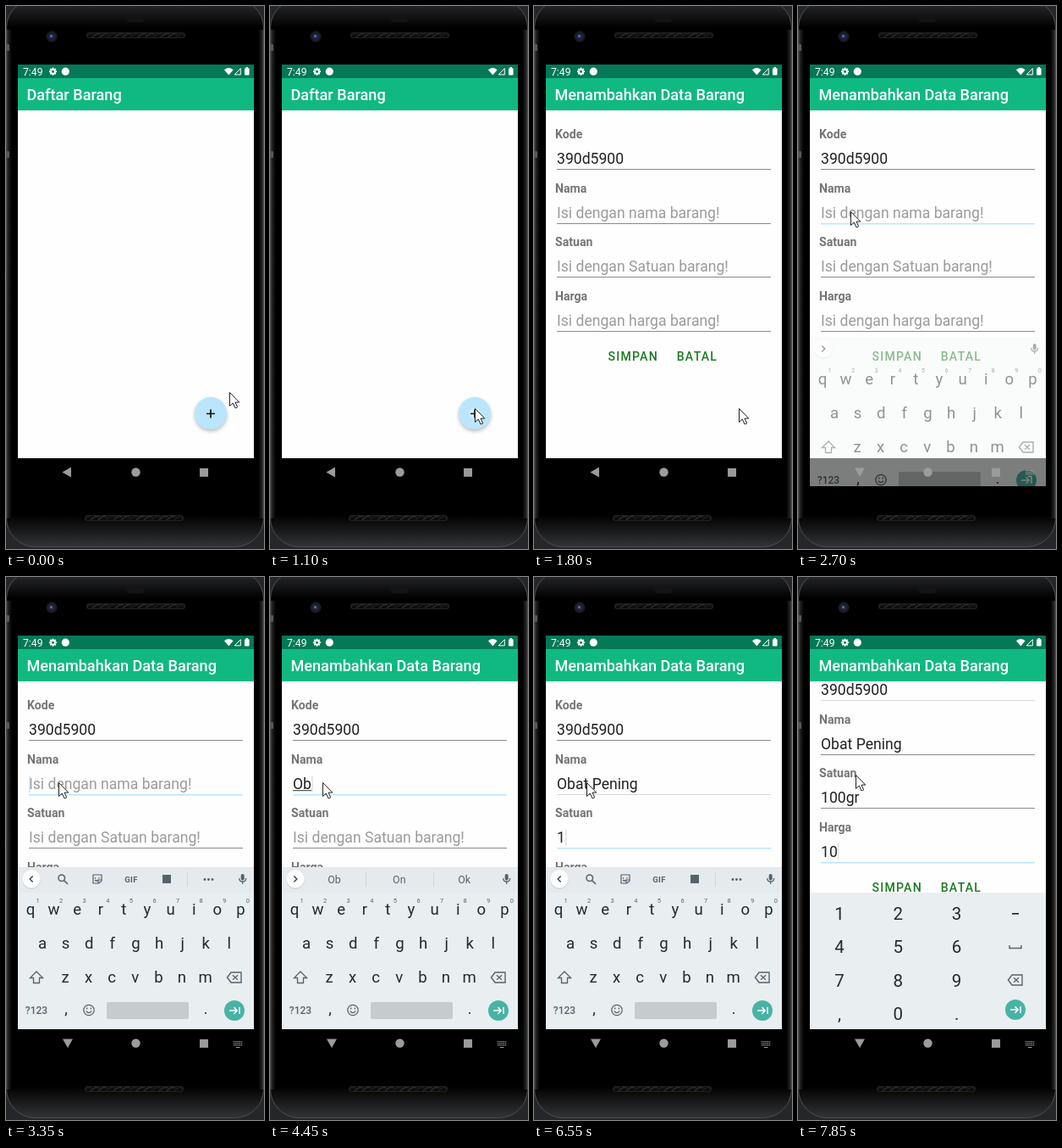
Animation of 305 by 640 pixels, one loop 8 s. Source, as an HTML page with a canvas:

```html
<!DOCTYPE html>
<html lang="id">
<head>
<meta charset="utf-8">
<title>Daftar Barang</title>
<style>
  html, body { margin: 0; width: 100%; height: 100%; overflow: hidden; background: #25262a; }
  canvas { display: block; width: 305px; height: 640px; }
</style>
</head>
<body>
<canvas id="stage"></canvas>
<script>
const ratio = window.devicePixelRatio || 1;

function context(canvas) {
  canvas.width = 305 * ratio;
  canvas.height = 640 * ratio;
  return canvas.getContext('2d');
}
const screen2d = context(document.getElementById('stage'));
const layer2d = context(document.createElement('canvas'));
let ctx = screen2d;

const LOOP = 8000;
const GREEN = '#10b981', DARK_GREEN = '#047857', SKY = '#bae6fd';
const INK = '#1f2b33', ICON = '#56636b', KEYBOARD = '#e9eef1', TEAL = '#48b3a5';
const ROW = 63.6;

const clamp = v => Math.max(0, Math.min(1, v));
const progress = (t, from, to) => clamp((t - from) / (to - from));
const easeOut = p => 1 - (1 - p) ** 5;
const mix = (a, b, p) => a + (b - a) * p;

// Last value in a list of [time, value] steps that has been reached.
const stepAt = (steps, t) => steps.filter(s => t >= s[0]).pop()?.[1] ?? '';

const NAME = [[3950, 'O'], [4450, 'Ob'], [4600, 'Oba'], [4750, 'Obat'], [4950, 'Obat '],
  [5100, 'Obat P'], [5250, 'Obat Pen'], [5450, 'Obat Pening']];
const UNIT = [[6550, '1'], [6750, '100'], [6950, '100gr']];
const PRICE = [[7700, '1'], [7850, '10']];
const WORDS = [[3950, ['O', 'Oh', 'Of']], [4450, ['Ob', 'On', 'Ok']], [4600, ['Oba', 'Obat', 'Ona']],
  [4750, ['Obat', 'Obat', 'Obatan']], [5100, ['P', 'Pada', 'Pas']],
  [5250, ['Pen', 'Penting', 'Pen']], [5450, ['Pening', 'Pening', 'Peningkatan']],
  [5650, null], [6950, ['100gr', '100', '100g']]];
const POINTER = [[0, 264, 455], [100, 264, 455], [400, 242, 474], [2250, 242, 474],
  [2500, 62, 242], [7350, 62, 242], [7550, 68, 233], [LOOP, 68, 233]];

function rect(x, y, w, h, color) {
  ctx.fillStyle = color;
  ctx.fillRect(x, y, w, h);
}

function pill(x, y, w, h, r, color) {
  ctx.fillStyle = color;
  ctx.beginPath();
  ctx.roundRect(x, y, w, h, r);
  ctx.fill();
}

function disc(x, y, r, color) {
  ctx.fillStyle = color;
  ctx.beginPath();
  ctx.arc(x, y, r, 0, 7);
  ctx.fill();
}

function text(str, x, y, size, color, { weight = 400, align = 'left', spacing = 0 } = {}) {
  ctx.font = `${weight} ${size}px Roboto, sans-serif`;
  ctx.letterSpacing = spacing + 'px';
  ctx.textAlign = align;
  ctx.fillStyle = color;
  ctx.fillText(str, x, y);
  return ctx.measureText(str).width;
}

// Path around (x, y): stroked, or filled when no line width is given.
function icon(x, y, path, color, width) {
  ctx.save();
  ctx.translate(x, y);
  const shape = new Path2D(path);
  ctx.fillStyle = ctx.strokeStyle = color;
  ctx.lineWidth = width;
  if (width) ctx.stroke(shape); else ctx.fill(shape);
  ctx.restore();
}

function clipped(x, y, w, h, draw) {
  ctx.save();
  ctx.beginPath();
  ctx.rect(x, y, w, h);
  ctx.clip();
  draw();
  ctx.restore();
}

// Draws a group on its own canvas, then blends it as one sheet.
function faded(alpha, draw) {
  ctx = layer2d;
  ctx.setTransform(ratio, 0, 0, ratio, 0, 0);
  ctx.clearRect(0, 0, 305, 640);
  draw();
  ctx = screen2d;
  ctx.save();
  ctx.globalAlpha = alpha;
  ctx.drawImage(layer2d.canvas, 0, 0, 305, 640);
  ctx.restore();
}

function speaker(x, y) {
  pill(x, y, 117, 7, 3.5, '#20201f');
  clipped(x + 2, y + 1, 113, 5, () => {
    rect(x, y, 117, 7, '#0d0d0c');
    for (let i = 0; i < 14; i++)
      icon(x + i * 9, y, 'M-2 6Q3 0 8 2', i % 3 ? '#2a2a26' : '#1c1c1a', 1.6);
  });
}

function phone() {
  rect(0, 0, 305, 640, '#25262a');
  const shade = ctx.createLinearGradient(0, 0, 0, 638);
  shade.addColorStop(0, '#232426');
  shade.addColorStop(.04, '#000');
  shade.addColorStop(.94, '#000');
  shade.addColorStop(1, '#343537');
  pill(.5, -8, 304, 645.5, 34, shade);
  const rim = ctx.createLinearGradient(0, 0, 7, 0);
  rim.addColorStop(0, '#4c4d50');
  rim.addColorStop(.4, '#1d1e1f');
  rim.addColorStop(1, '#000');
  for (const side of [1, -1]) {
    ctx.save();
    if (side < 0) {
      ctx.translate(305, 0);
      ctx.scale(-1, 1);
    }
    rect(.5, 28, 6.5, 576, rim);
    ctx.restore();
  }
  ctx.beginPath();
  ctx.roundRect(.5, -8, 304, 645.5, 34);
  ctx.lineWidth = 1;
  ctx.strokeStyle = '#4c4d50';
  ctx.stroke();
  pill(0, 45, 4, 8, 1, '#55565a');
  pill(0, 171, 4, 8, 1, '#55565a');
  pill(143, 11, 20, 8, 3, '#141415');
  disc(54, 36, 6.5, '#1b1c22');
  disc(54, 36, 3.6, '#20264a');
  disc(53.5, 35.5, 1.5, '#5a6db0');
  speaker(95, 31);
  speaker(93, 600);
}

function statusIcons() {
  text('7:49', 20, 82, 12.2, '#fff');
  for (let i = 0; i < 4; i++) {
    const a = i * Math.PI / 4, c = Math.cos(a) * 4.6, s = Math.sin(a) * 4.6;
    icon(55.5, 77.2, `M${-c} ${-s}L${c} ${s}`, '#fff', 1.8);
  }
  disc(55.5, 77.2, 3.4, '#fff');
  disc(55.5, 77.2, 1.5, DARK_GREEN);
  disc(70.3, 77.2, 4.6, '#fff');
  icon(263.3, 81.5, 'M0 0L-5.3 -6.3Q0 -10.5 5.3 -6.3Z', '#fff');
  icon(269.5, 81.5, 'M.7 -.6H7.8V-7.8Z', '#fff', 1);
  pill(282, 73.2, 5.6, 8.4, 1, '#fff');
  rect(283.6, 72, 2.4, 2, '#fff');
}

function navButtons(typing) {
  const gray = '#9b9b9b';
  if (typing) {
    icon(73, 549.5, 'M-6 -5H6L0 5.5Z', gray);
    for (let r = 0; r < 3; r++)
      for (let c = 0; c < 5; c++) rect(269 + c * 2.2, 547 + r * 2.1, 1.4, 1.2, gray);
    rect(272, 554, 4.5, 1, gray);
  } else {
    icon(72, 549.5, 'M-5.5 0L5 -6V6Z', gray);
  }
  disc(153.5, 549.5, 5.2, gray);
  rect(229, 544.8, 10, 10, gray);
}

function appWindow(title) {
  rect(14, 69, 279, 16, DARK_GREEN);
  rect(14, 85, 279, 448, '#fefefe');
  rect(14, 533, 279, 33, '#000');
  rect(14, 85, 279, 38, GREEN);
  text(title, 24.5, 111, 18.1, '#fff', { weight: 500 });
}

function listScreen(t) {
  appWindow('Daftar Barang');
  ctx.save();
  ctx.shadowColor = 'rgba(0,0,0,.25)';
  ctx.shadowBlur = 4 * ratio;
  ctx.shadowOffsetY = 2.5 * ratio;
  disc(242, 480, 19, SKY);
  ctx.restore();
  const ripple = progress(t, 1050, 1200);
  if (ripple) disc(242, 480, 19 * ripple, 'rgba(255,255,255,.4)');
  icon(242, 480.5, 'M-5 0H5M0 -5V5', '#111', 1.7);
}

function formScreen(t) {
  appWindow('Menambahkan Data Barang');
  const scroll = 47.5 * easeOut(progress(t, 7400, 7550));
  const focus = t < 2600 ? -1 : t < 5650 ? 1 : t < 7400 ? 2 : 3;
  const composing = focus === 1 || (focus === 2 && t >= 6950);
  const fields = [
    ['Kode', '390d5900', ''],
    ['Nama', stepAt(NAME, t), 'Isi dengan nama barang!'],
    ['Satuan', stepAt(UNIT, t), 'Isi dengan Satuan barang!'],
    ['Harga', stepAt(PRICE, t), 'Isi dengan harga barang!'],
  ];
  clipped(14, 123, 279, 410, () => {
    ctx.translate(0, -scroll);
    fields.forEach(([label, value, hint], i) => {
      const y = Math.round(i * ROW);
      text(label, 25, 156 + y, 14.1, '#757575', { weight: 700 });
      const width = text(value || hint, 27, 186 + y, 17.6, value ? '#212121' : '#9b9b9b');
      const active = i === focus;
      const faint = (i === 1 && focus === 2) || (i === 0 && scroll > 0);
      rect(27, Math.round(192 + y - scroll) + scroll, 253, active ? 1.5 : 1,
        active ? SKY : faint ? '#d8d8d8' : '#8a8a8a');
      if (!active || t < 3100) return;
      const caret = 27.3 + (value ? width : 0);
      rect(caret, 170.5 + y, 1.2, 19.5, value ? '#cfdde4' : SKY);
      if (value && composing) {
        const start = value.lastIndexOf(' ') + 1;
        const left = start ? ctx.measureText(value.slice(0, start)).width : 0;
        rect(27 + left, 187.2 + y, width - left, 1, '#333');
      }
    });
    const button = { weight: 500, spacing: 1.25 };
    text('SIMPAN', 87.5, 418, 14.1, '#1d7a24', button);
    text('BATAL', 168.7, 418, 14.1, '#1d7a24', button);
  });
}

function enterKey(x, y) {
  disc(x, y, 12, TEAL);
  icon(x, y, 'M-6 0H3M-.5 -3.7L3.2 0L-.5 3.7M6 -4V4', '#fff', 1.5);
}

function backspace(x, y) {
  icon(x, y, 'M-8.5 0L-4 -6H8V6H-4ZM-2 -2.8L4 2.8M4 -2.8L-2 2.8', ICON, 1.4);
}

function toolbar(t) {
  const words = stepAt(WORDS, t);
  const shown = t < 5000 ? progress(t, 2950, 3350) : progress(t, 5650, 6050);
  const open = !words && shown > 0;
  disc(30, 357, 10.7, 'rgba(90,110,120,.2)');
  disc(30, 356, 10.5, '#fff');
  icon(30, 356, open ? 'M1.7 -3.5L-1.8 0L1.7 3.5' : 'M-1.7 -3.5L1.8 0L-1.7 3.5', '#37444c', 1.4);

  pill(277.7, 350, 4, 7.5, 2, ICON);
  icon(279.7, 356, 'M-4 -1Q-4 3 0 3Q4 3 4 -1M0 3V6', ICON, 1.3);

  if (words) {
    words.forEach((word, i) => text(word, 76 + i * 76.8, 360.5, 12.4, ICON, { align: 'center' }));
    rect(113, 348, 1, 17, '#cfd5d9');
    rect(193, 348, 1, 17, '#cfd5d9');
  } else if (open) {
    ctx.save();
    ctx.globalAlpha = shown;
    ctx.translate(-25 * (1 - easeOut(shown)), 0);
    icon(67, 356, 'M2.6 -1.2A3.8 3.8 0 1 1 -5 -1.2A3.8 3.8 0 1 1 2.6 -1.2M1.6 1.6L6 6', ICON, 1.5);
    icon(108, 356, 'M-5 -5H5V2L2 5H-5ZM5 1H1V5M-2.5 -2V-.5M2 -2V-.5M-3 1Q-1 3 1 1', ICON, 1.2);
    text('GIF', 148, 359.8, 9.5, ICON, { weight: 700, align: 'center', spacing: .3 });
    rect(185, 351, 10, 10, ICON);
    rect(214, 348, 1, 17, '#cfd5d9');
    for (let i = -1; i < 2; i++) disc(239.5 + i * 4.5, 356.5, 1.4, ICON);
    ctx.restore();
  }
}

function letterKeyboard(t, settled) {
  rect(14, 342, 279, 230, settled ? KEYBOARD : '#f8fafa');
  if (settled) rect(14, 342, 279, 30, '#e4eaed');
  toolbar(t);
  const caps = (t >= 3800 && t < 4050) || (t >= 4950 && t < 5250);
  [['qwertyuiop', 29, 398], ['asdfghjkl', 43, 438], ['zxcvbnm', 70, 478]].forEach(([keys, x0, y], row) => {
    [...keys].forEach((key, i) => {
      const x = x0 + i * 27.6;
      text(caps ? key.toUpperCase() : key, x, y, 18.6, INK, { align: 'center' });
      if (row === 0) text((i + 1) % 10, x + 8.5, 384, 7.5, ICON, { align: 'center' });
    });
  });
  const arrow = 'M0 -7L7.5 .5H3.5V6.5H-3.5V.5H-7.5Z';
  if (caps) icon(36, 472, arrow, ICON);
  icon(36, 472, arrow, ICON, 1.3);
  backspace(270, 472);
  text('?123', 36, 515, 12, ICON, { weight: 500, align: 'center' });
  text(',', 71, 515, 18, INK, { align: 'center' });
  icon(98, 510.5, 'M6.2 0A6.2 6.2 0 1 1 -6.2 0A6.2 6.2 0 1 1 6.2 0M-3.3 1.2Q0 5.2 3.3 1.2M-2.3 -3V-1M2.3 -3V-1', ICON, 1.3);
  pill(119, 501, 97, 20, 2, '#c6cbce');
  text('.', 236, 515, 18, INK, { align: 'center' });
  enterKey(270, 511);
}

function numberKeyboard() {
  rect(14, 372, 279, 161, KEYBOARD);
  ['123', '456', '789', ',0.'].forEach((keys, row) =>
    [...keys].forEach((key, col) =>
      text(key, 49 + col * 69.3, 403.8 + row * 39.4, 20.5, INK, { align: 'center' })));
  rect(253, 396, 8, 1.7, INK);
  icon(257, 436, 'M-7 -2V1.5H7V-2', ICON, 1.4);
  backspace(257, 475);
  enterKey(257, 510);
}

function keyboard(t) {
  if (t >= 7550) return numberKeyboard();
  const p = progress(t, 2600, 2800);
  if (!p) return;
  faded(p, () => {
    ctx.translate(0, 96 * (1 - p));
    letterKeyboard(t, p === 1);
  });
  if (p === 1) rect(14, 533, 279, 33, '#000');
}

function scaled(scale, draw) {
  ctx.save();
  ctx.translate(153.5, 317.5);
  ctx.scale(scale, scale);
  ctx.translate(-153.5, -317.5);
  draw();
  ctx.restore();
}

function pointer(t) {
  const next = Math.max(1, POINTER.findIndex(p => p[0] > t));
  const [t0, x0, y0] = POINTER[next - 1], [t1, x1, y1] = POINTER[next];
  const p = progress(t, t0, t1), x = mix(x0, x1, p) + .5, y = mix(y0, y1, p) + .5;
  const arrow = 'M0 0V16L3.8 12.5L6.6 18.5L9.2 17.3L6.5 11.6H11.3Z';
  icon(x, y, arrow, '#fff');
  icon(x, y, arrow, '#222', 1);
}

function render(t) {
  ctx.setTransform(ratio, 0, 0, ratio, 0, 0);
  phone();
  clipped(14, 69, 279, 497, () => {
    const opening = easeOut(progress(t, 1150, 1550));
    if (opening < 1) scaled(mix(1, 1.0515, opening), () => listScreen(t));
    if (opening > 0)
      faded(progress(t, 1150, 1250), () => scaled(mix(.85, 1, opening), () => formScreen(t)));
    keyboard(t);
    statusIcons();
    navButtons(t >= 2600);
  });
  pointer(t);
}

// The picture advances every 50 ms, like a screen recording.
const start = performance.now();
function tick() {
  const elapsed = (performance.now() - start) % LOOP;
  render(Math.floor(elapsed / 50) * 50);
  requestAnimationFrame(tick);
}
tick();
</script>
</body>
</html>
```
